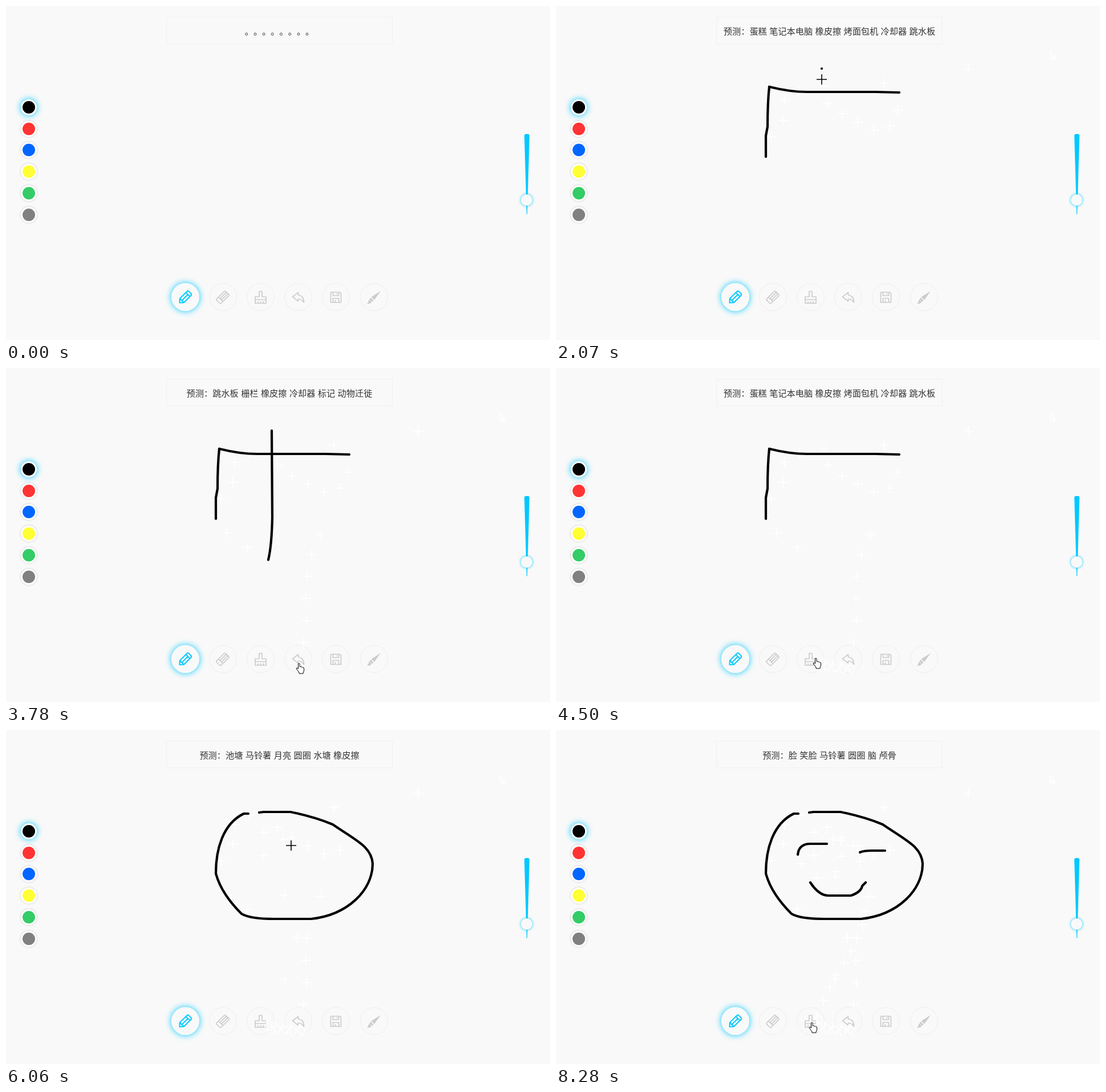
An HTML page that plays this animation: 954 px wide and 587 px high, repeating every 8310 ms.

```html
<!DOCTYPE html>
<html lang="zh-CN">
<head>
<meta charset="utf-8">
<title>Sketch guess</title>
<style>
html, body { margin: 0; width: 100%; height: 100%; overflow: hidden; background: #f9f9f9; }
body { position: relative; }
svg { position: absolute; left: 0; top: 0; }
.swatch { position: absolute; left: 26.3px; width: 22px; height: 22px; border: 3px solid #fff; border-radius: 50%; box-shadow: 0 0 3px 1px #ddd; }
.swatch.on { box-shadow: 0 0 12px #00c8ff; }
.button { position: absolute; top: 487px; width: 47px; height: 47px; border: 1px solid #eee; border-radius: 50%; }
.button.on { border-color: #f9f9f9; box-shadow: 0 0 12px #00c8ff; }
.knob { position: absolute; left: 903px; top: 331px; width: 20px; height: 20px; border-radius: 50%; background: #f9f9f9; box-shadow: 0 0 5px #00c8ff; z-index: 1; }
#icons { fill: none; stroke: #ccc; stroke-width: 1.7; stroke-linejoin: round; }
#strokes { fill: none; stroke: #000; stroke-width: 4.2; stroke-linecap: round; stroke-linejoin: round; }
#trail { fill: none; stroke: #fff; stroke-width: 1.5; }
#cursor { fill: #fff; stroke: #000; stroke-width: 1; }
#label {
  font: 300 15.2px "Noto Sans CJK SC", "Noto Sans CJK", sans-serif; word-spacing: 1px;
  text-spacing-trim: space-all; font-kerning: none; font-feature-settings: "chws" 0, "halt" 0;
  fill: #333; text-anchor: middle;
}
</style>
</head>
<body>
<div class="knob"></div>
<svg width="954" height="587" viewBox="0 0 954 587">
  <defs>
    <path id="cross" d="M-9 0H9M0-9V9" stroke-width="1.6"/>
    <path id="arrow" d="M-4-7V6l3-3 2 5 2-1-2-4h4Z"/>
    <path id="hand" d="M-1.5 9V1q0-1 1.3-1t1.3 1V6q2.5-1 3 .5 2-.5 2.5 1 2-.3 2 1.5V12q0 2-1.5 4v2H0V16L-4.5 10q-1-1.7.5-2Q-3 8-1.5 9.5Z"/>
  </defs>
  <rect x="281.5" y="19.500" width="396" height="47" fill="none" stroke="#f0f0f0"/>
  <path d="M909 228q0-3 3-3h3q3 0 3 3L914 366h-1Z" fill="#00c8ff"/>
  <g id="icons">
    <path stroke="#00c8ff" stroke-width="2" transform="translate(314 512) rotate(45)" d="M-5 8V-10q0-2 2-2h6q2 0 2 2V8L0 13.500ZM-5-7H5M-5 8H5M0-7V8"/>
    <path transform="translate(380 512) rotate(45)" d="M-5.500-9q0-2 2-2h7q2 0 2 2V9q0 2-2 2h-7q-2 0-2-2ZM-5.500 5H5.500M-1.800-11V5M1.800-11V5"/>
    <path transform="translate(446.5 512)" d="M-2.500-1V-10.500H2.500V-1H9.500V10.500H-9.500V-1ZM-9.500 4H9.500M-4.500 7V10M0 7V10M4.500 7V10"/>
    <path transform="translate(512.5 512)" d="M-10-1 0-8.500V-4Q10-3 10 9 6 3 0 3V7Z"/>
    <path transform="translate(578.5 512)" d="M-9-9H7L9-7V9H-9ZM-5-9V-3H5V-9M-5 9V2H5V9M2-7V-5M-1 5V9"/>
    <path transform="translate(645 512)" fill="#ccc" stroke="none" d="M12-11 1 4.500-4.500-.5ZM-5.500.5-.5 5.500-3 8-7.500 3.500ZM-8 4-4 8Q-6 12-12 11-9 9-9 6-9 4-8 4Z"/>
  </g>
  <text id="label" x="479.5" y="49.5"></text>
  <g id="trail"></g>
  <g id="strokes"></g>
  <use id="cursor"/>
</svg>
<script>
const LOOP = 8310, TICK = 30, LAG = 82, TRAIL_STEP = 60;
const $ = id => document.getElementById(id);

function addDiv(className, style) {
  const div = document.createElement('div');
  div.className = className;
  Object.assign(div.style, style);
  document.body.prepend(div);
}
['#000', '#f33', '#06f', '#ff3', '#3c6', '#808080'].forEach((background, i) =>
  addDiv(i ? 'swatch' : 'swatch on', { background, top: 163.8 + i * 37.8 + 'px' }));
for (let i = 0; i < 6; i++) addDiv(i ? 'button' : 'button on', { left: 289.5 + i * 66.2 + 'px' });

function addSvg(parent, tag, attributes) {
  const node = document.createElementNS('http://www.w3.org/2000/svg', tag);
  for (const key in attributes) node.setAttribute(key, attributes[key]);
  return parent.appendChild(node);
}
function show(node, visible) {
  node.style.display = visible ? '' : 'none';
}
function pointerAt({ x, y }) {
  const shape = y > 487 ? 'hand' : x > 800 ? 'arrow' : 'cross';
  return { href: '#' + shape, x: Math.round(x), y: Math.round(y) };
}

class Move {
  constructor(start, end, d, group) {
    this.start = start;
    this.end = end;
    this.path = addSvg(group, 'path', { d });
    this.length = this.path.getTotalLength();
  }
  distance(t) {
    return this.length * Math.min(1, Math.max(0, (t - this.start) / (this.end - this.start)));
  }
  pointer(t) {
    return pointerAt(this.path.getPointAtLength(this.distance(t)));
  }
}

// A drawn line follows the pointer with a delay and stays until it is undone or cleared.
class Stroke extends Move {
  constructor(start, end, d, removed = LOOP) {
    super(start, end, d, $('strokes'));
    this.removed = removed;
  }
  render(t) {
    show(this.path, t >= this.start && t < this.removed);
    this.path.style.strokeDasharray = this.distance(t - LAG) + ' 2000';
  }
}

// A free move leaves pale pointer marks at equal time steps.
class Travel extends Move {
  constructor(start, end, d) {
    super(start, end, d, $('trail'));
    show(this.path, false);
    this.marks = [];
    for (let time = start + TRAIL_STEP; time < end; time += TRAIL_STEP)
      this.marks.push({ time, node: addSvg($('trail'), 'use', this.pointer(time)) });
  }
  render(t) {
    for (const { time, node } of this.marks) show(node, t > time);
  }
}

const UNDO = 3600, UNDO_AGAIN = 4080, CLEAR = 4590;
const moves = [
  new Travel(120, 393, 'M1010 30L872 87 566 137 362 156 374 142'),
  new Stroke(510, 840, 'M374 142Q371 170 371 212L368 228V265', CLEAR),
  new Travel(840, 1080, 'M368 265L378 225Q400 205 404 184T374 142'),
  new Stroke(1140, 1500, 'M374 142Q410 151 440 151H560L602 152', CLEAR),
  new Travel(1530, 2010, 'M602 152Q602 215 565 221 505 195 473 168L466 110'),
  new Stroke(2040, 2390, 'M466 110L467 262Q466 312 460 337', UNDO_AGAIN),
  new Travel(2420, 2610, 'M460 337Q385 295 362 265L373 254'),
  new Stroke(2640, 2900, 'M373 254Q376 258 395 258T430 261H485Q525 264 577 264', UNDO),
  new Travel(2930, 3340, 'M577 264Q545 290 534 334T527 446L517 514'),
  new Travel(3510, 3600, 'M517 514L514 519'),
  new Travel(4200, 4450, 'M514 519L456 510'),
  new Travel(4590, 4890, 'M456 510L514 382Q500 290 450 217 445 180 425 147'),
  new Stroke(4900, 5912, 'M425 147H417C380 165 368 210 368 252C374 275 390 300 413 323Q428 332 470 332H535C600 325 643 281 643 235C641 205 615 195 573 166Q542 153 499 144H452L444 145'),
  new Travel(5912, 6300, 'M444 145Q440 190 480 192T487 265Q440 265 424 219'),
  new Stroke(6310, 6450, 'M424 219Q426 200 446 200H475'),
  new Travel(6470, 6690, 'M475 200L508 192 543 222 533 215'),
  new Stroke(6700, 6788, 'M533 215Q540 212 553 212H577'),
  new Travel(6900, 7080, 'M577 212L446 268'),
  new Stroke(7100, 7440, 'M446 268Q461 291 478 291H517Q535 285 537 274L543 268'),
  new Travel(7560, 8190, 'M543 268Q550 300 540 330 530 375 490 433L452 508'),
  new Travel(8200, 8270, 'M452 508L449 514')
];

const empty = '。'.repeat(8);
const corner = '预测：蛋糕 笔记本电脑 橡皮擦 烤面包机 冷却器 跳水板';
const crossed = '预测：跳水板 栅栏 橡皮擦 冷却器 标记 动物迁徙';
const labels = [
  [0, empty],
  [1620, corner],
  [2520, crossed],
  [3000, '预测：标记 医院 跳水板 指甲 动物迁徙 栅栏'],
  [UNDO + 150, crossed],
  [UNDO_AGAIN + 150, corner],
  [CLEAR, empty],
  [6030, '预测：池塘 马铃薯 月亮 圆圈 水塘 橡皮擦'],
  [6600, '预测：池塘 马铃薯 月亮 脑 圆圈 水塘'],
  [7620, '预测：脸 笑脸 马铃薯 圆圈 脑 颅骨']
];

function render() {
  const t = Math.floor(performance.now() % LOOP / TICK) * TICK;
  const text = labels.findLast(([time]) => time <= t)[1];
  if ($('label').textContent !== text) $('label').textContent = text;

  for (const move of moves) move.render(t);

  const current = moves.findLast(move => move.start <= t);
  show($('cursor'), current);
  if (current) {
    const pointer = current.pointer(t);
    for (const key in pointer) $('cursor').setAttribute(key, pointer[key]);
  }
  requestAnimationFrame(render);
}
render();
</script>
</body>
</html>
```
